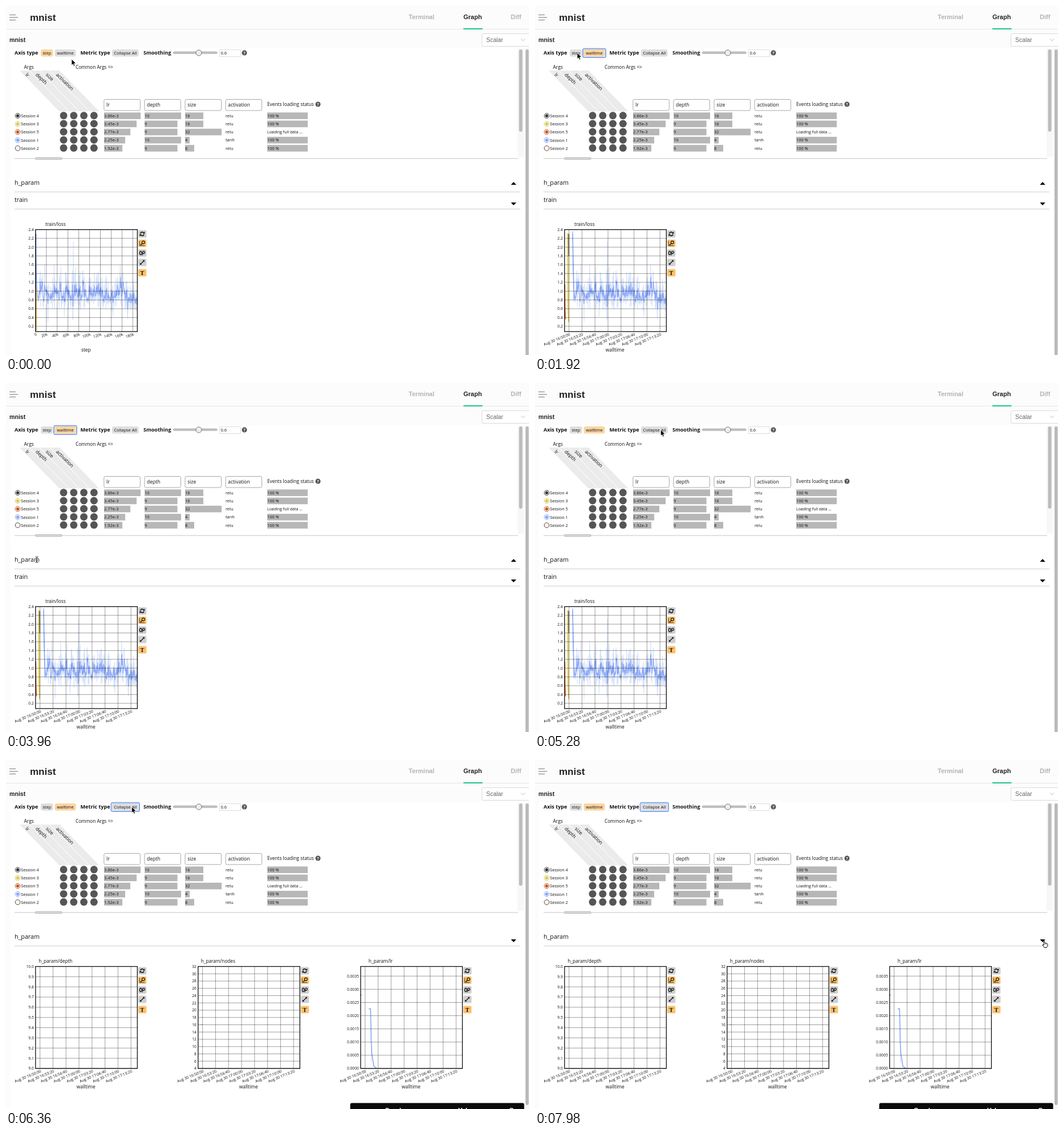
An HTML page with a canvas that plays this animation: 917 by 611 pixels, repeating every 8 s.

```html
<!DOCTYPE html>
<html lang="en">
<head>
<meta charset="utf-8">
<title>Training dashboard</title>
<style>
  html, body { margin: 0; width: 100%; height: 100%; overflow: hidden; background: #fcfcfc; }
  canvas { display: block; }
</style>
</head>
<body>
<canvas id="stage" width="917" height="611"></canvas>
<script>
const ctx = document.getElementById('stage').getContext('2d');
const LOOP = 8000, STEP = 60;
const SANS = '"Open Sans", "Noto Sans", sans-serif';
const HEAD = '"Liberation Sans", Arial, sans-serif';
const BLUE = '#82a2f8', ORANGE = '#fec26d', GRAY = '#b7b7b7';

// ---------- drawing helpers ----------
function text(str, x, y, size, { weight = 400, color = '#111', align = 'left', family = SANS } = {}) {
  ctx.font = `${weight} ${size}px ${family}`;
  ctx.fillStyle = color;
  ctx.textAlign = align;
  ctx.fillText(str, x, y);
}
function rotated(str, x, y, degrees, size, align) {
  ctx.save();
  ctx.translate(x, y);
  ctx.rotate(degrees * Math.PI / 180);
  text(str, 0, 0, size, { align });
  ctx.restore();
}
function rect(x, y, w, h, color) {
  ctx.fillStyle = color;
  ctx.fillRect(x, y, w, h);
}
function path(points, { stroke, fill, width = 1, close = false } = {}) {
  ctx.beginPath();
  points.forEach(([x, y], i) => i ? ctx.lineTo(x, y) : ctx.moveTo(x, y));
  if (close) ctx.closePath();
  paint(stroke, fill, width);
}
function box(x, y, w, h, r, fill, stroke, width = 1) {
  ctx.beginPath();
  ctx.roundRect(x, y, w, h, r);
  paint(stroke, fill, width);
}
function circle(x, y, r, fill, stroke, width = 1) {
  ctx.beginPath();
  ctx.arc(x, y, r, 0, 7);
  paint(stroke, fill, width);
}
function paint(stroke, fill, width) {
  if (fill) { ctx.fillStyle = fill; ctx.fill(); }
  if (stroke) { ctx.strokeStyle = stroke; ctx.lineWidth = width; ctx.stroke(); }
}
const line = (x1, y1, x2, y2, stroke, width) => path([[x1, y1], [x2, y2]], { stroke, width });

function help(x, y) {
  circle(x, y, 4.5, '#555');
  text('?', x, y + 2.8, 7.5, { weight: 700, color: '#fff', align: 'center' });
}

// ---------- noisy loss curve ----------
function makeLoss(count) {
  let seed = 11, smooth = 2.3;
  const random = () => (seed = (seed * 16807) % 2147483647) / 2147483647;
  return Array.from({ length: count }, (_, i) => {
    const u = i / (count - 1);
    const spread = random() + random() + random() - 1.5;
    let raw = 0.9 + spread * (spread > 0 ? 0.58 : 0.42) + 1.4 * Math.exp(-i / 1.4);
    smooth = i ? smooth * 0.6 + raw * 0.4 : 2.3;
    if (i === Math.round(count * 0.37)) raw = 2.13;
    return { u, raw, smooth };
  });
}
const LOSS = makeLoss(330);

// ---------- page frame ----------
function header() {
  rect(0, 0, 917, 611, '#fcfcfc');
  rect(7, 74, 902, 537, '#fff');
  rect(0, 40, 917, 1, '#e6e6e6');
  for (const [y, right] of [[15.5, 17], [20, 21], [24.5, 17]]) line(6, y, right, y, '#8a8a8a', 1.2);
  const opts = { weight: 700, family: HEAD };
  text('mnist', 42, 25.5, 17, { ...opts, color: '#222' });
  text('Terminal', 706, 23, 11, { ...opts, color: '#b3b3b3' });
  text('Graph', 802, 23, 11, { ...opts, color: '#222' });
  text('Diff', 885, 23, 11, { ...opts, color: '#b3b3b3' });
  rect(802, 39, 33.5, 2, '#1fc291');
  text('mnist', 6, 62.5, 10.6, { ...opts, color: '#222' });
  box(834.5, 48.5, 90, 22, 2, '#fff', '#d9d9d9');
  text('Scalar', 842, 63, 10.4, { family: HEAD, color: '#666' });
  path([[903, 57.5], [906.5, 61], [910, 57.5]], { stroke: '#b5b5b5' });
}
function scrollbars(expanded) {
  rect(897, 75, 11, 189, '#f7f7f7');
  box(899.5, 76, 6, 144, 3, '#bcbcbc');
  rect(909, 74, 8, 537, '#f8f8f8');
  box(911, 76, 5.5, expanded ? 528 : 540, 3, '#b9b9b9');
}
function button(label, x, w, active, focused) {
  box(x, 76, w, 12.5, 3, active ? '#fbd5a2' : '#dedede');
  if (focused) box(x - 1.5, 74.7, w + 3, 15.4, 2.5, null, '#85a9ee', 2);
  text(label, x + w / 2, 84.8, 7.5, { align: 'center' });
}
function controls(wall, focus) {
  const bold = { weight: 700 };
  text('Axis type', 15, 85.3, 9.1, bold);
  text('Metric type', 130.5, 85.3, 9.1, bold);
  text('Smoothing', 241, 85.3, 9, bold);
  button('step', 61, 21.5, !wall, focus === 'step');
  button('walltime', 85.5, 37, wall, focus === 'walltime');
  button('Collapse All', 186, 46.5, false, focus === 'collapse');
  box(293.5, 80.5, 76.5, 2.6, 1.3, '#ddd', '#777', 0.8);
  circle(338, 82, 5, '#eee', '#777');
  box(374.5, 76.5, 37, 12, 0, '#fff', '#ddd');
  text('0.6', 376.5, 85, 7.5);
  help(418, 82);
}

// ---------- session table ----------
const SESSIONS = [
  { id: 4, color: '#333', lr: '3.86e-3', bar: 64, depth: 10, size: 16, act: 'relu' },
  { id: 3, color: '#d9c84f', lr: '3.45e-3', bar: 57, depth: 9, size: 16, act: 'relu' },
  { id: 5, color: '#c4500f', lr: '2.77e-3', bar: 46, depth: 9, size: 32, act: 'relu' },
  { id: 1, color: BLUE, lr: '2.25e-3', bar: 37, depth: 10, size: 4, act: 'tanh' },
  { id: 2, color: '#fff', lr: '1.92e-3', bar: 32, depth: 9, size: 8, act: 'relu' },
];
const COLUMNS = ['lr', 'depth', 'size', 'activation'];

function cell(value, x, y, barWidth) {
  if (barWidth) rect(x, y - 5.8, barWidth, 11.6, GRAY);
  text(value, x, y + 2.6, 7.4);
}
function table() {
  text('Args', 31.5, 109.5, 8.4);
  text('Common Args =>', 122, 109.5, 8.2);
  COLUMNS.forEach((name, i) => {
    const x = 24 + i * 17.8;
    path([[x, 113], [x + 16.6, 113], [x + 86, 184.5], [x + 69.4, 184.5]], { fill: '#ebebeb', close: true });
    rotated(name, x + 9.5, 121, 44, 8.7);
    const left = 171.8 + i * 71.1;
    box(left, 163.5, 63.5, 19.5, 2.5, '#fff', '#a8a8a8');
    text(name, left + 4.2, 176, 8.5);
  });
  text('Events loading status', 458, 175.2, 8.3, { weight: 500 });
  help(547, 172);
  SESSIONS.forEach((s, i) => {
    const y = 192.2 + i * 14.2;
    circle(20.5, y, 4.3, '#fff', s.id === 2 ? '#5b3a25' : s.color);
    circle(20.5, y, 2.6, s.color);
    text('Session ' + s.id, 26.2, y + 2.7, 7.2);
    for (let d = 0; d < 4; d++) circle(101 + d * 17.75, y - 0.4, 6.5, '#555');
    cell(s.lr, 172, y, s.bar);
    cell(s.depth, 243, y, s.depth * 6.4);
    cell(s.size, 314, y, s.size * 2);
    cell(s.act, 385, y);
    if (s.id === 5) text('Loading full data ...', 458, y + 2.6, 7);
    else cell('100 %', 458, y, 71);
  });
  rect(15, 266.5, 883, 1, '#c4c4c4');
  box(51.5, 265.5, 46.5, 3, 1, '#ddd', '#a5a5a5', 0.8);
}

// ---------- sections and charts ----------
function section(name, y, open) {
  text(name, 15, y + 3.2, 10.7);
  rect(15, y + 15, 887, 1, '#cfcfcf');
  const base = open ? y + 4 : y + 3, tip = open ? 5 : -5;
  path([[885.3, base], [894.7, base], [890, base + tip]], { fill: '#000', close: true });
}
function tool(x, y, active) {
  box(x - 7, y - 6.5, 14.5, 13, 2, active ? ORANGE : '#cfcfcf');
}
function toolbar(x, top) {
  const ys = [7.5, 24, 41, 57.5, 75.5].map(d => top + d);
  ys.forEach((y, i) => tool(x, y, i === 1 || i === 4));
  for (const side of [0, Math.PI]) {
    ctx.beginPath();
    ctx.arc(x, ys[0], 3.2, side + 0.25, side + 2.6);
    paint('#111', null, 1.5);
  }
  path([[x + 4.5, ys[0] - 4], [x + 4.5, ys[0] - 0.5], [x + 1, ys[0] - 0.5]], { fill: '#111', close: true });
  path([[x - 4.5, ys[0] + 4], [x - 4.5, ys[0] + 0.5], [x - 1, ys[0] + 0.5]], { fill: '#111', close: true });
  path([[x - 4.5, ys[1] - 4], [x - 4.5, ys[1] + 4], [x + 4.5, ys[1] + 4]], { stroke: '#333', width: 0.9 });
  circle(x + 2, ys[1] - 1.7, 2.5, null, '#111', 1.2);
  line(x + 0.2, ys[1] + 0.2, x - 3, ys[1] + 3, '#111', 1.5);
  ctx.beginPath();
  ctx.ellipse(x - 2.7, ys[2], 1.8, 3.2, 0, 0, 7);
  paint('#111', null, 1.2);
  circle(x + 2.5, ys[2] - 1.2, 2, null, '#111', 1.2);
  line(x + 1, ys[2], x + 0.2, ys[2] + 4, '#111', 1.2);
  const e = ys[3];
  line(x - 3, e + 3, x + 3, e - 3, '#111', 1.2);
  path([[x + 4, e - 4], [x + 4, e - 0.8], [x + 0.8, e - 4]], { fill: '#111', close: true });
  path([[x - 4, e + 4], [x - 4, e + 0.8], [x - 0.8, e + 4]], { fill: '#111', close: true });
  text('T', x, ys[4] + 3.8, 10.5, { weight: 700, align: 'center', family: '"Liberation Serif", serif' });
}
function clock(i) {
  const s = 16 * 3600 + 50 * 60 + i * 200;
  const parts = [Math.floor(s / 3600), Math.floor(s / 60) % 60, s % 60];
  return 'Aug 30 ' + parts.map(n => String(n).padStart(2, '0')).join(':');
}

// yTicks: { count, first, gap, label } where first is the lowest tick offset above the bottom edge
function chart({ left, top, title, wall, yTicks, data }) {
  const size = 178.5, bottom = top + size;
  text(title, left + 35, top - 7, 8.2, { align: 'center' });
  if (data) {
    ctx.save();
    ctx.beginPath();
    ctx.rect(left, top, size, size);
    ctx.clip();
    data();
    ctx.restore();
  }
  const grid = 'rgba(0,0,0,.5)';
  for (let i = 0; i < yTicks.count; i++) {
    const y = bottom - yTicks.first - i * yTicks.gap;
    line(left, y, left + size, y, grid, 0.75);
    text(yTicks.label(i), left - 3, y + 2.4, 6.7, { align: 'right' });
  }
  const xCount = wall ? 8 : 10;
  ctx.save();
  ctx.beginPath();
  ctx.rect(left - 36.5, top, 260, 250);
  ctx.clip();
  for (let i = 0; i < xCount; i++) {
    const x = left + (wall ? 7.8 + i * 22.8 : i * 18.95);
    line(x, top, x, bottom, grid, 0.75);
    if (wall) rotated(clock(i), x + 2.5, bottom + 6.5, -22, 6.7, 'right');
    else rotated(i ? i * 20 + 'k' : '0', x + 2.5, bottom + 6.5, -20, 6.7, 'right');
  }
  ctx.restore();
  ctx.strokeStyle = '#111';
  ctx.lineWidth = 1.3;
  ctx.strokeRect(left, top, size, size);
  text(wall ? 'walltime' : 'step', left + 88.5, bottom + 34.5, 8.4, { align: 'center' });
  toolbar(left + 187, top);
}
function lossChart(wall) {
  const top = 391.5, left = 51.8, y = v => top + (2.4 - v) * 77;
  const x0 = wall ? left + 14 : left, span = 178.5 - (wall ? 14 : 0);
  const curve = key => LOSS.map(p => [x0 + p.u * span, y(p[key])]);
  const data = () => {
    path(curve('raw'), { stroke: 'rgba(130,170,250,.36)', width: 1.1 });
    path(curve('smooth'), { stroke: 'rgba(125,157,247,.92)', width: 1 });
    if (!wall) {
      line(left + 0.8, y(2.3), left + 0.8, y(0.9), '#5c78d8', 1.2);
      line(left + 1.2, y(1.1), left + 1.2, y(0.1), '#d9a72c', 1.6);
      return;
    }
    line(66, y(2.36), 68.5, y(0.8), BLUE, 1.2);
    path([[52.3, y(1.15)], [52.6, y(0.65)], [53.4, y(0.36)]], { stroke: '#d65a1c', width: 1.6 });
    path([[57, y(2.32)], [57.8, y(0.6)], [59, y(0.3)]], { stroke: '#d9c84f', width: 1.7 });
    line(59.2, y(2.32), 59.2, y(0.3), '#d9c84f', 1.2);
    line(59.2, y(2.3), 59.4, y(1.8), '#333', 1.3);
  };
  chart({
    left, top, title: 'train/loss', wall, data,
    yTicks: { count: 12, first: 9.2, gap: 15.4, label: i => (0.2 + i * 0.2).toFixed(1) },
  });
}
function paramCharts() {
  const base = { top: 361.5, wall: true };
  chart({ ...base, left: 51.8, title: 'h_param/depth',
    yTicks: { count: 11, first: 0, gap: 17.85, label: i => (9 + i / 10).toFixed(1) } });
  chart({ ...base, left: 336.8, title: 'h_param/nodes',
    yTicks: { count: 15, first: 0, gap: 12.75, label: i => 4 + i * 2 },
    data: () => line(341.5, 463, 344.5, 463, '#999', 0.8) });
  chart({ ...base, left: 621.8, title: 'h_param/lr',
    yTicks: { count: 8, first: 0, gap: 23.1, label: i => (i * 0.0005).toFixed(4) },
    data: () => {
      line(639, 435, 641, 530, 'rgba(130,162,248,.35)', 1.2);
      path([[636, 435.5], [639.3, 435.5], [640.3, 490], [641.5, 514], [645, 536], [650, 540]], { stroke: BLUE, width: 1.4 });
      line(627, 380, 629.5, 380, '#d9c84f', 0.8);
      line(621.8, 411.5, 623.5, 411.5, '#333', 1);
    } });
  box(603.5, 600.5, 305, 20, 3, '#0b0b0b');
  [['Graph', 664], ['Values', 793], ['Go', 882]].forEach(([label, x]) =>
    text(label, x, 617, 11, { weight: 700, color: '#fff', family: HEAD }));
}

// ---------- pointer ----------
const TRAIL = [
  [0, 115, 93], [300, 107, 80], [1320, 107, 80], [1920, 74, 82], [2160, 70.5, 82.5], [2700, 70.5, 82.5],
  [2880, 101, 82], [3060, 101, 82], [3720, 54, 309], [3960, 54, 309], [4380, 213.5, 130],
  [4500, 213.5, 130], [4680, 384, 195], [4860, 384, 195], [5220, 220.5, 82], [7440, 220.5, 82],
  [7980, 892, 316], [8000, 892, 316],
];
function pointerAt(t) {
  const i = TRAIL.findIndex(k => k[0] > t);
  const [a, b] = [TRAIL[i - 1], TRAIL[i]];
  const u = (t - a[0]) / (b[0] - a[0]), e = u * u * (3 - 2 * u);
  return [a[1] + (b[1] - a[1]) * e, a[2] + (b[2] - a[2]) * e];
}
function pointer(t) {
  const [x, y] = pointerAt(t);
  const at = points => points.map(([dx, dy]) => [x + dx, y + dy]);
  if (x < 62 && y > 300) {
    path(at([[-2.5, -5], [0, -4], [2.5, -5]]), { stroke: '#222' });
    path(at([[-2.5, 5.5], [0, 4.5], [2.5, 5.5]]), { stroke: '#222' });
    line(x, y - 4, x, y + 4.5, '#222', 1);
    line(x - 1.5, y + 1.5, x + 1.5, y + 1.5, '#222', 0.8);
  } else if (x > 885) {
    path(at([[-0.5, 0], [1, 0], [2, 4.5], [5.5, 5], [7, 6.5], [6.5, 9.5], [5, 12.5], [1, 12.5],
      [-2, 8], [-1.5, 7], [0.5, 8]]), { fill: '#fff', stroke: '#111', close: true });
    line(x + 3, y + 5, x + 3, y + 7, '#111', 0.7);
    line(x + 5, y + 5.5, x + 5, y + 7, '#111', 0.7);
  } else {
    path(at([[0, 0], [0, 10.6], [2.4, 8.5], [4, 12.2], [5.8, 11.4], [4.3, 7.8], [7.5, 7.6]]),
      { fill: '#000', stroke: '#fff', width: 0.7, close: true });
  }
}

// ---------- timeline ----------
function focusAt(t) {
  if (t < 960) return null;
  if (t < 2280) return 'walltime';
  if (t < 2880) return 'step';
  if (t < 4920) return 'walltime';
  return t < 5400 ? null : 'collapse';
}
function viewAt(t) {
  if (t < 5460) return 'train';
  return t < 6000 || (t >= 6540 && t < 6900) ? 'closed' : 'all';
}
function render(t) {
  const wall = (t >= 1080 && t < 2460) || t >= 3060;
  const view = viewAt(t);
  header();
  controls(wall, focusAt(t));
  table();
  section('h_param', 310, view === 'all');
  if (view === 'all') paramCharts();
  else section('train', 340, view === 'train');
  if (view === 'train') lossChart(wall);
  scrollbars(view === 'all');
  pointer(t);
}
const start = performance.now();
function frame() {
  const t = (performance.now() - start) % LOOP;
  render(Math.floor(t / STEP) * STEP);
  requestAnimationFrame(frame);
}
frame();
</script>
</body>
</html>
```
